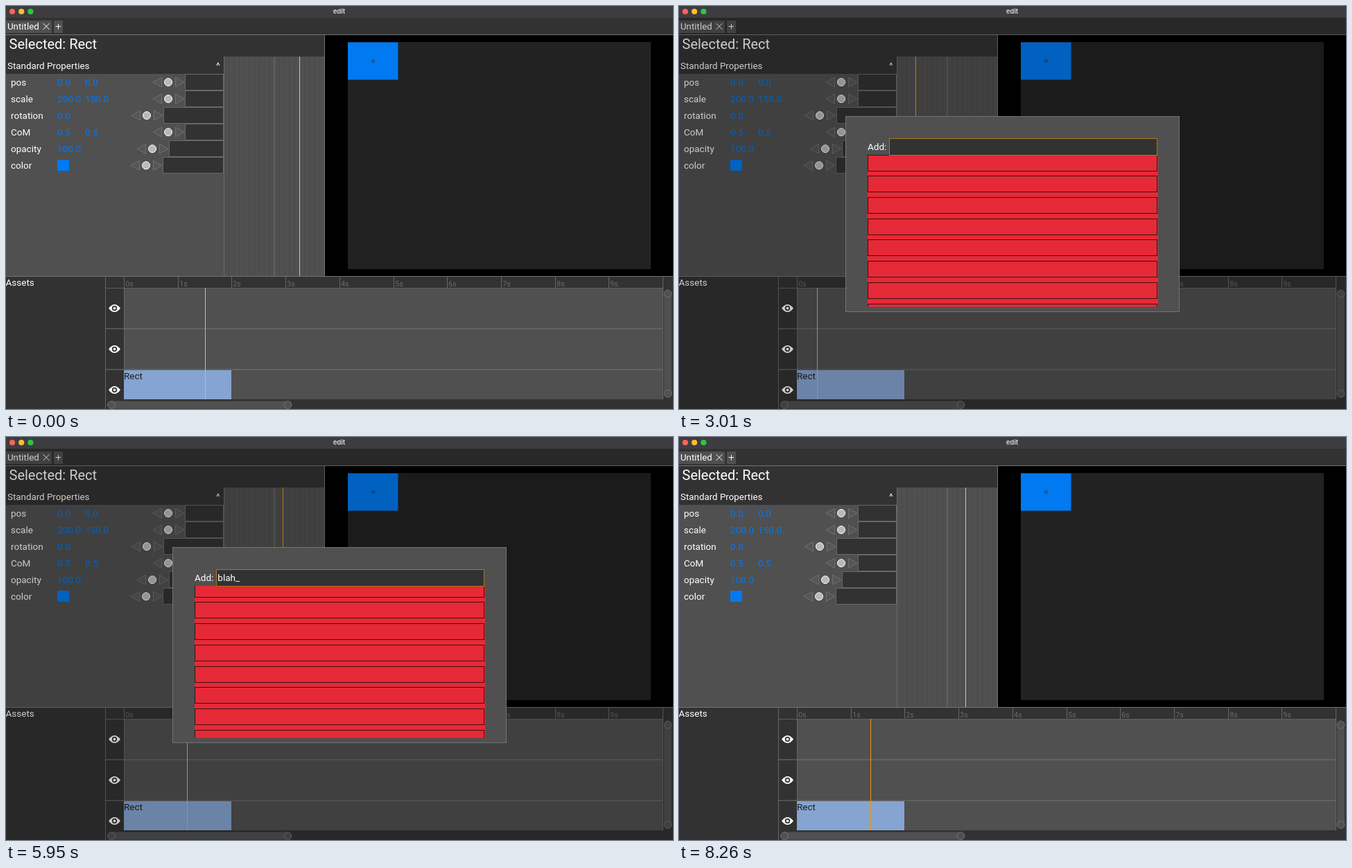
These frames come from a looping animation (962x582 px, 8.33 s). An HTML page with a canvas:

```html
<!DOCTYPE html>
<html lang="en">
<head>
<meta charset="utf-8">
<title>edit</title>
<style>
  html, body { margin: 0; width: 100%; height: 100%; overflow: hidden; background: #323232; }
  canvas { display: block; }
</style>
</head>
<body>
<canvas id="stage" width="962" height="582"></canvas>
<script>
const g = document.getElementById('stage').getContext('2d');
const LOOP = 8330, STEP = 70;
const DARK = '#323232', PANEL = '#505050', EDGE = '#747474';
const BLUE = '#0079f1', RED = '#e62937', ORANGE = '#f09a08';
const OPEN = 7, CLOSE = 112;          // steps at which the dialog appears and leaves
const SECOND = 77.72, ROW = 30.7;
const WORD = 'blah_effect';
const KEYS = [65, 67, 69, 72, 82, 86, 88, 91, 94, 98, 101];

function box(x, y, w, h, fill, edge) {
  if (fill) { g.fillStyle = fill; g.fillRect(x, y, w, h); }
  if (edge) { g.strokeStyle = edge; g.lineWidth = 1; g.strokeRect(x + .5, y + .5, w - 1, h - 1); }
}

function line(x1, y1, x2, y2, color, width = 1) {
  g.strokeStyle = color;
  g.lineWidth = width;
  g.beginPath();
  g.moveTo(x1, y1);
  g.lineTo(x2, y2);
  g.stroke();
}

function disc(x, y, r, fill, edge) {
  g.beginPath();
  g.arc(x, y, r, 0, 7);
  g.fillStyle = fill;
  g.fill();
  if (edge) { g.strokeStyle = edge; g.lineWidth = 1; g.stroke(); }
}

function text(s, x, y, color = '#fff', size = 13.5) {
  g.font = size + 'px Roboto, sans-serif';
  g.fillStyle = color;
  g.fillText(s, x, y);
}

function arrow(tip, base, y) {
  g.beginPath();
  g.moveTo(tip, y);
  g.lineTo(base, y - 7);
  g.lineTo(base, y + 7);
  g.closePath();
  g.fillStyle = '#565656';
  g.fill();
  g.strokeStyle = '#707070';
  g.lineWidth = 1;
  g.stroke();
}

function eye(x, y) {
  g.beginPath();
  g.moveTo(x - 8.5, y);
  g.quadraticCurveTo(x, y - 11, x + 8.5, y);
  g.quadraticCurveTo(x, y + 11, x - 8.5, y);
  g.fillStyle = '#fff';
  g.fill();
  disc(x, y, 3.7, DARK);
  disc(x, y, 1.9, '#fff');
}

function titleBar() {
  box(0, 0, 962, 17, '#3d3d41');
  ['#ff6159', '#fdbd2e', '#29c941'].forEach((c, i) => disc(9 + 13.2 * i, 8, 4.1, c));
  g.font = 'bold 9.5px Inter, sans-serif';
  g.fillStyle = '#cfcfcf';
  g.textAlign = 'center';
  g.fillText('edit', 480.5, 11);
  g.textAlign = 'left';
}

function tabs() {
  box(0, 21, 66, 18, PANEL);
  box(69, 21, 13, 18, PANEL);
  text('Untitled', 2, 34, '#fff', 13.3);
  line(53.5, 25, 62.5, 34, '#fff');
  line(62.5, 25, 53.5, 34, '#fff');
  line(71.5, 29.5, 79, 29.5, '#fff');
  line(75.5, 26, 75.5, 33.5, '#fff');
  line(0, 41.5, 962, 41.5, EDGE);
}

function properties() {
  box(0, 98, 314, 292, PANEL);
  box(314, 73, 146, 317, PANEL);
  text('Selected: Rect', 4.5, 62, '#fff', 20);
  text('Standard Properties', 2, 90.5, '#fff', 13.35);
  text('^', 303, 91);

  const rows = [
    ['pos', 259, '0.0', '0.0'],
    ['scale', 259, '200.0', '150.0'],
    ['rotation', 228, '0.0'],
    ['CoM', 259, '0.5', '0.5'],
    ['opacity', 236, '100.0'],
    ['color', 227]
  ];
  rows.forEach(([name, x, a, b], i) => {
    const y = 110 + 24.05 * i;
    text(name, 7, y + 4.7);
    if (a) text(a, 74, y + 4.7, BLUE, 13.6);
    else box(74, 222, 17, 16, BLUE);
    if (b) text(b, 114, y + 4.7, BLUE, 13.6);
    arrow(x - 47, x - 34.5, y);
    arrow(x - 2, x - 14.5, y);
    disc(x - 25, y, 5.5, '#b9b9b9', '#fff');
    box(x - 1, Math.round(y - 12), 315 - x, 24, DARK, '#686868');
  });

  for (let i = 1; i < 20; i++)
    line(314.5 + 7.25 * i, 74, 314.5 + 7.25 * i, 390, i === 10 ? '#707070' : '#494949');
  line(314.5, 73, 314.5, 390, '#686868');
  line(459.5, 41, 459.5, 390, EDGE);
}

function preview() {
  box(460, 42, 502, 348, '#000');
  box(493, 52, 437, 328, '#222');
  box(493, 52.5, 72.5, 54, BLUE);
  disc(529.5, 79.5, 2.2, '#1760ad', '#164f8a');
}

function timeline() {
  line(0, 390.5, 962, 390.5, EDGE);
  text('Assets', -.5, 404);
  line(143.5, 390, 143.5, 582, '#666');
  box(170, 407, 777, 161, PANEL);
  for (const y of [407.5, 466, 525]) line(143, y, 947, y, y < 410 ? '#606060' : EDGE);
  for (let i = 0; i <= 10; i++) {
    const x = Math.round(170 + SECOND * i) + .5;
    line(x, 391, x, 407, '#666');
    if (i < 10) text(i + 's', x + 1.8, 405, '#6b6b6b', 10.5);
  }
  line(170.5, 391, 170.5, 568, '#666');
  line(947.5, 391, 947.5, 568, '#666');
  for (const y of [436.5, 495.5, 554.5]) eye(156.5, y);
  box(170, 526, 155, 42, '#86a4d1');
  text('Rect', 170, 539.3, '#1c1c1c');

  box(152, 570.5, 254, 11, PANEL);
  box(949, 415, 11, 145, PANEL);
  for (const [x, y] of [[152, 576], [406.5, 576], [954.5, 415.5], [954.5, 560]])
    disc(x, y, 5.3, PANEL, EDGE);
}

function playheads(n) {
  const t = (1.513 + n / 15) % 2.002;
  const lower = Math.floor(170 + SECOND * t) + .5;
  const upper = Math.floor(314 + 72.6 * t) + .5;
  line(upper, 73, upper, 390, (n + 3) % 10 < 4 ? '#c4c4c4' : ORANGE);
  line(lower, 407, lower, 568, n * 3 % 7 < 4 ? '#b8b8b8' : ORANGE);
}

function dialog(n) {
  box(0, 17, 962, 565, 'rgba(0,0,0,.2)');
  box(240, 159, 482, 283, PANEL, EDGE);

  g.save();
  g.beginPath();
  g.rect(270, 215, 423, 219.5);
  g.clip();
  box(272, 215, 419, 220, RED);
  const top = 229 - .895 * (n - 27);
  const first = top + Math.ceil((185 - top) / ROW) * ROW;
  for (let y = first; y < 436; y += ROW)
    box(272, Math.round(y), 418, 24, null, '#3a1014');
  g.restore();

  text('Add:', 272, 208);
  box(303, 191, 387, 25, DARK, '#a8781c');
  text(WORD.slice(0, KEYS.filter(k => k <= n).length), 305.3, 208);
}

function draw(n) {
  box(0, 0, 962, 582, DARK);
  titleBar();
  tabs();
  properties();
  preview();
  timeline();
  playheads(n);
  if (n >= OPEN && n < CLOSE) dialog(n);
}

const start = performance.now();
function tick() {
  draw(Math.floor((performance.now() - start) % LOOP / STEP));
  requestAnimationFrame(tick);
}
tick();
</script>
</body>
</html>
```
